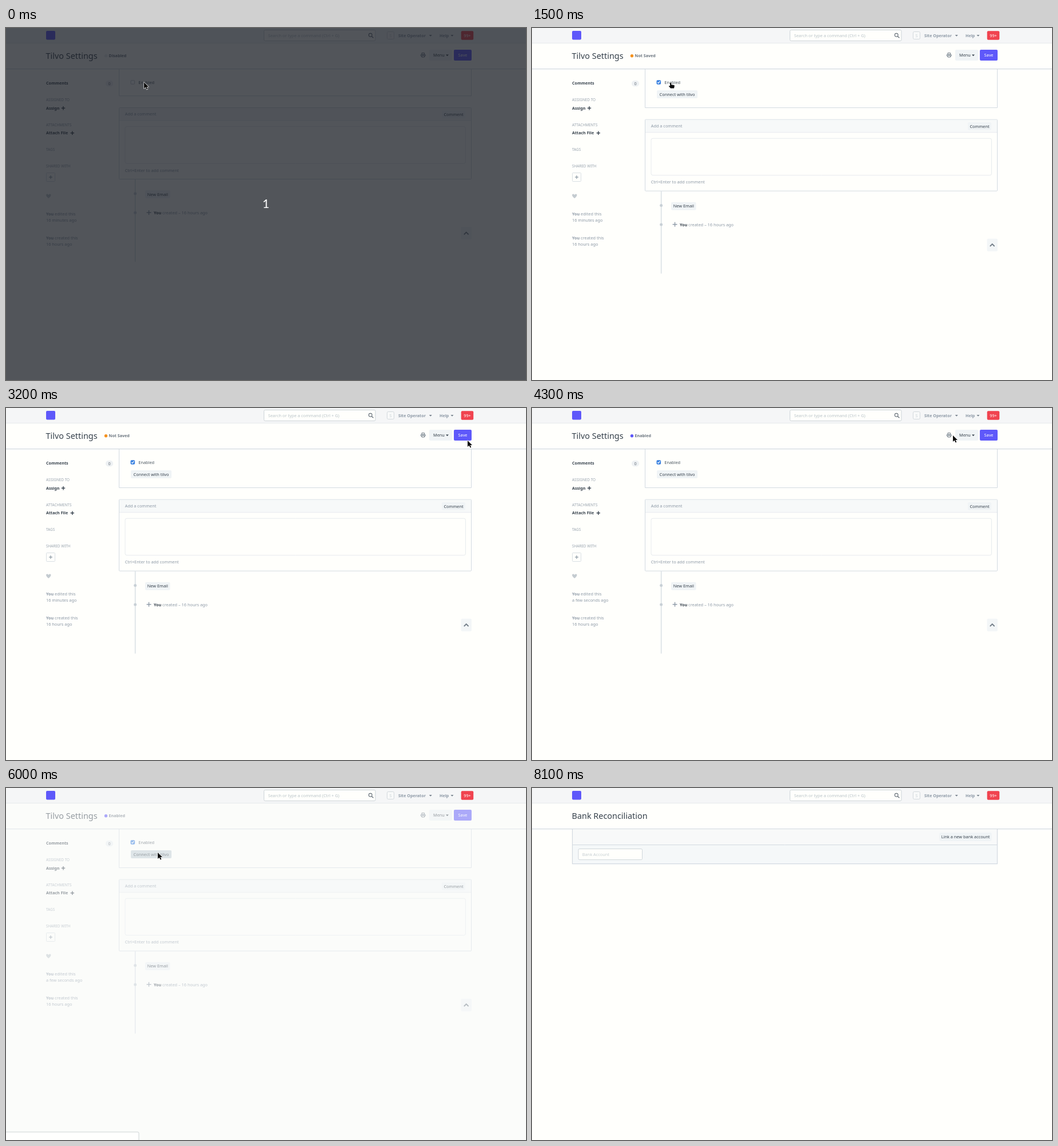
Animation, 908 px wide and 616 px high, one loop 8600 ms. Source, as an HTML page with a canvas:

```html
<!DOCTYPE html>
<html lang="en">
<head>
<meta charset="utf-8">
<title>Settings demo</title>
<style>
html, body { margin: 0; width: 100%; height: 100%; overflow: hidden; background: #fffffc; }
canvas { display: block; width: 908px; height: 616px; }
</style>
</head>
<body>
<canvas id="stage"></canvas>
<script>
const W = 908, H = 616, LOOP = 8600, STEP = 100;
const canvas = document.getElementById('stage');
const ctx = canvas.getContext('2d');
const dpr = window.devicePixelRatio || 1;
canvas.width = W * dpr;
canvas.height = H * dpr;

const C = {
  page: '#fffffc', bar: '#f5f6f7', line: '#d3dae1', soft: '#e7ebee',
  button: '#f0f4f6', hover: '#c6d2d7', ink: '#36414c', muted: '#8d99a6',
  faint: '#b9c3c8', blue: '#5e58fa', deep: '#3d36e0', red: '#f0434f', orange: '#f5921f'
};

// pointer path: time, x, y
const path = [
  [0, 241, 95], [1700, 241, 95], [2000, 600, 41], [2100, 600, 41],
  [2200, 606, 38], [2500, 700, 11], [2800, 804, 55], [3100, 804, 55],
  [3200, 806, 57], [3400, 799, 48], [3900, 799, 48], [4300, 735, 48],
  [4500, 514, 64], [4700, 514, 64], [4900, 357, 101], [5000, 357, 101],
  [5400, 265, 113], [7600, 265, 113], [8000, 101, 32]
];

function text(s, x, y, { bold, size = bold ? 7.15 : 7.35, color = C.ink, align = 'left', face = '"Noto Sans"' } = {}) {
  ctx.font = `${bold ? 700 : 400} ${size}px ${face}, sans-serif`;
  ctx.textAlign = align;
  ctx.fillStyle = color;
  ctx.fillText(s, x, y);
  return x + ctx.measureText(s).width;
}

function box(x, y, w, h, fill, stroke, r = 0) {
  ctx.beginPath();
  ctx.roundRect(x, y, w, h, r);
  if (fill) { ctx.fillStyle = fill; ctx.fill(); }
  if (stroke) { ctx.strokeStyle = stroke; ctx.lineWidth = 1; ctx.stroke(); }
}

function line(points, color, width = 1) {
  ctx.beginPath();
  points.forEach(([x, y]) => ctx.lineTo(x, y));
  ctx.strokeStyle = color;
  ctx.lineWidth = width;
  ctx.stroke();
}

function poly(points, color) {
  ctx.beginPath();
  points.forEach(([x, y]) => ctx.lineTo(x, y));
  ctx.closePath();
  ctx.fillStyle = color;
  ctx.fill();
}

function dot(x, y, r, color) {
  ctx.beginPath();
  ctx.arc(x, y, r, 0, 7);
  ctx.fillStyle = color;
  ctx.fill();
}

function plus(x, y, r, color, width = 1.4) {
  line([[x - r, y], [x + r, y]], color, width);
  line([[x, y - r], [x, y + r]], color, width);
}

const caret = (x, y, color) => poly([[x, y], [x + 5, y], [x + 2.5, y + 2.7]], color);

function button(label, x, y, w, h, fill = C.button, color = C.ink) {
  box(x, y, w, h, fill, null, 2);
  text(label, x + w / 2, y + h / 2 + 2.7, { color, align: 'center' });
}

function navbar() {
  box(0, 0, W, 26, C.bar);
  line([[0, 26.5], [W, 26.5]], '#e6eaed');
  box(70, 5, 16, 15.5, C.blue, null, 2);
  box(450.5, 3.5, 194.5, 19, C.page, '#cdd4d8', 2);
  text('Search or type a command (Ctrl + G)', 457.7, 15.8, { color: C.faint });
  ctx.beginPath();
  ctx.arc(636.3, 12.3, 2.9, 0, 7);
  ctx.strokeStyle = '#66707a';
  ctx.lineWidth = 1.1;
  ctx.stroke();
  line([[638.4, 14.4], [641.5, 17.3]], '#66707a', 1.4);
  box(665.5, 6.5, 12, 13, '#f8f9f9', '#d3d9dd', 2);
  text('S', 671.5, 15.8, { color: '#ccd3d7', align: 'center' });
  text('Site Operator', 685, 15.8, { bold: true, color: C.muted });
  caret(738.8, 12, '#77828d');
  text('Help', 757, 15.8, { bold: true, color: C.muted });
  caret(776.5, 12, '#77828d');
  box(794.7, 5.3, 21.5, 15.4, C.red, null, 2);
  text('99+', 805.5, 15.8, { color: '#fff', align: 'center' });
}

function pageHead(title) {
  text(title, 69.6, 54.3, { size: 14.4 });
  line([[0, 71.7], [W, 71.7]], C.line, 1.2);
}

function printer() {
  const c = '#717c86';
  box(726, 43.7, 4.6, 3, null, c);
  box(724.3, 46.3, 8, 3, '#dfe4e7', c, 1);
  box(726, 48.2, 4.6, 2.8, C.page, c);
}

function heart(x, y) {
  ctx.beginPath();
  ctx.moveTo(x, y + 4);
  ctx.bezierCurveTo(x - 8, y - 2, x - 2.5, y - 6, x, y - 2);
  ctx.bezierCurveTo(x + 2.5, y - 6, x + 8, y - 2, x, y + 4);
  ctx.fillStyle = '#c4cbd0';
  ctx.fill();
}

function youDid(action, when, y) {
  const x = text('You', 70, y, { bold: true, color: C.muted });
  text(' ' + action + ' this', x, y, { color: C.muted });
  text(when, 70, y + 11.2, { color: C.muted });
}

function sidebar(saved) {
  text('Comments', 70, 99, { bold: true });
  box(174, 92, 13, 10.5, '#eef1f3', null, 5);
  text('0', 180.5, 100, { color: '#66707a', align: 'center' });
  [['ASSIGNED TO', 128.4], ['ATTACHMENTS', 172], ['TAGS', 215.4], ['SHARED WITH', 243.5]]
    .forEach(([s, y]) => text(s, 70, y, { size: 6.4, color: '#98a3ae' }));
  text('Assign', 70, 143, { bold: true });
  plus(100, 140.2, 3.2, C.ink);
  text('Attach File', 70, 186.4, { bold: true });
  plus(115.8, 183.7, 3.2, C.ink);
  box(70.5, 253.5, 15, 15, null, '#d9dfe3', 1);
  plus(78, 261, 3, C.muted, 1.2);
  heart(74.3, 294);
  youDid('edited', saved ? 'a few seconds ago' : '16 minutes ago', 327.8);
  youDid('created', '16 hours ago', 369.5);
}

function checkbox(on) {
  box(218, 91.8, 6.6, 6.4, on ? '#3b82e0' : '#fff', on ? '#3b82e0' : '#bfc5ca', 1);
  if (on) line([[219.3, 95], [220.8, 96.6], [223.5, 93.2]], '#fff', 1.2);
}

function commentArea() {
  box(197.5, 139.5, 615, 125, null, C.line, 1);
  box(198, 140, 614, 22, '#f7f9f9');
  line([[198, 162], [812, 162]], C.soft);
  text('Add a comment', 207.7, 153.3, { color: C.muted });
  button('Comment', 761, 144.5, 41, 13.5);
  box(208, 172.5, 594.5, 64.5, null, C.soft, 3);
  text('Ctrl+Enter to add comment', 207.7, 251.5, { color: C.muted });
  line([[225.6, 265], [225.6, 409]], C.line, 1.3);
  dot(225.6, 289.7, 2.5, '#c8d0d6');
  dot(225.6, 323.3, 2.5, '#c8d0d6');
  button('New Email', 243, 284, 43.5, 14);
  plus(249.5, 323, 4, C.muted);
  const x = text('You', 258, 326.3, { bold: true });
  text(' created – 16 hours ago', x, 326.3, { color: C.muted });
  box(794.5, 348, 18.5, 22, '#f3f6f7', null, 2);
  line([[799.8, 361.3], [803.7, 357.4], [807.6, 361.3]], '#727d87', 1.8);
}

function settingsPage(t) {
  const on = t >= 1500, saved = t >= 4000;
  const [status, color] = saved ? ['Enabled', C.blue] : on ? ['Not Saved', C.orange] : ['Disabled', '#e8ebea'];
  pageHead('Tilvo Settings');
  dot(174.5, 48.7, 2.7, color);
  text(status, 179.6, 51.4, { bold: true, color: '#6c7680' });
  printer();
  box(739, 38, 40, 19, C.button, null, 2);
  text('Menu', 746, 50.2);
  caret(768, 46.5, C.ink);
  button('Save', 782, 38, 31, 19, t >= 3300 && t < 4100 ? C.deep : C.blue, '#fff');
  sidebar(saved);

  const shift = on ? 20.7 : 0;
  line([[197.5, 72], [197.5, 118.8 + shift], [812.5, 118.8 + shift], [812.5, 72]], C.line);
  checkbox(on);
  text('Enabled', 231.3, 98.4, { color: '#4c5761' });
  if (on) button('Connect with tilvo', 218, 109, 71, 14, t >= 5300 ? C.hover : C.button);
  ctx.save();
  ctx.translate(0, shift);
  commentArea();
  ctx.restore();
}

function bankPage(t) {
  pageHead('Bank Reconciliation');
  if (t < 6500) return;
  box(71, 72.3, 741, 27, '#f8f9f9');
  box(71, 99.5, 741, 33, '#f5f8f9');
  line([[71, 99.5], [812, 99.5]], C.line);
  line([[70.5, 72], [70.5, 132.7], [812.5, 132.7], [812.5, 72]], C.line, 1.2);
  button('Link a new bank account', 711.5, 78, 91, 15);
  box(81, 106.5, 111.5, 19, C.page, '#d0d7db', 2);
  text('Bank Account', 87.7, 118.6, { color: '#c6ced2' });
}

// opacity of the white veil shown while the form is busy
function veil(t) {
  const ramp = (from, to) => Math.max(0, Math.min(1, (t - from) / (to - from)));
  if (t < 4100) return 0.5 * (ramp(3500, 3700) - ramp(3900, 4100));
  return t < 6300 ? 0.5 * ramp(5700, 6000) : 0;
}

function pointerAt(t) {
  const i = path.findIndex(p => p[0] > t);
  if (i < 0) return path[path.length - 1].slice(1);
  const [t0, x0, y0] = path[i - 1], [t1, x1, y1] = path[i];
  const k = (t - t0) / (t1 - t0);
  return [x0 + (x1 - x0) * k, y0 + (y1 - y0) * k];
}

const arrow = new Path2D('M0 0V11L2.6 8.6L4.6 12.6L6.4 11.7L4.5 7.9H8Z');
const hand = new Path2D('M0 1.2Q1.1 0 2.2 1.2V4.2L7 5Q8 5.3 7.8 6.5L7 10.5H1L-2 7Q-2.2 5.8-1 6L0 6.8Z');

function pointer(t) {
  if (t >= 8100) return;
  const isHand = (t >= 500 && t < 1800) || (t >= 3300 && t < 3600) || (t >= 5300 && t < 5800);
  const shape = isHand ? hand : arrow;
  ctx.save();
  ctx.translate(...pointerAt(t));
  ctx.lineJoin = 'round';
  ctx.strokeStyle = '#fff';
  ctx.lineWidth = 1.2;
  ctx.stroke(shape);
  ctx.fillStyle = '#0c0c0c';
  ctx.fill(shape);
  ctx.restore();
}

function draw(t) {
  ctx.setTransform(dpr, 0, 0, dpr, 0, 0);
  box(0, 0, W, H, C.page);
  if (t < 6300) settingsPage(t); else bankPage(t);
  const a = veil(t);
  if (a > 0) box(0, 27, W, H - 27, `rgba(247,250,250,${a})`);
  navbar();
  if (t >= 5900 && t < 6300) box(-2, 602, 234, 20, '#fffffe', '#cdd3d5', 2);
  if (t < 500) {
    box(0, 0, W, H, 'rgba(24,28,37,0.75)');
    text('1', 453.8, 315, { size: 21, color: '#fff', align: 'center', face: 'Lato' });
  }
  pointer(t);
}

const start = performance.now();

function tick() {
  const t = (performance.now() - start) % LOOP;
  draw(Math.floor(t / STEP) * STEP);
  requestAnimationFrame(tick);
}

tick();
</script>
</body>
</html>
```
